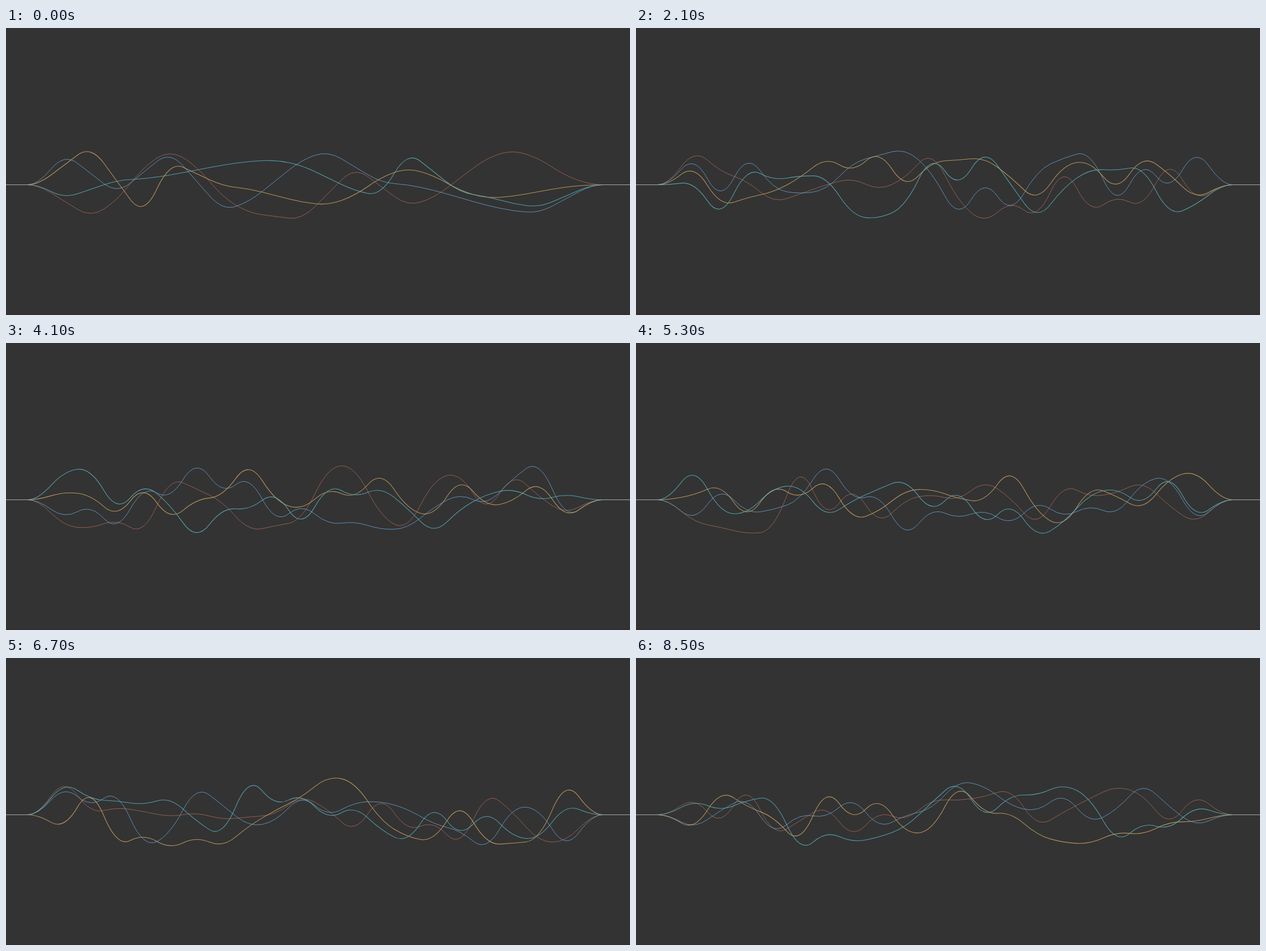
Animation of 1102x508 px, one loop 8600 ms. Source, as an HTML page with a canvas:

```html
<!DOCTYPE html>
<html lang="en">
<head>
<meta charset="utf-8">
<title>Waves</title>
<style>
  html, body { margin: 0; width: 100%; height: 100%; overflow: hidden; background: #333; }
  canvas { display: block; }
</style>
</head>
<body>
<canvas id="stage" width="1102" height="508"></canvas>
<script>
const ctx = document.getElementById('stage').getContext('2d');
const W = 1102, H = 508, MID = 277, AXIS = MID + 0.5;
const LOOP = 8600, STEP = 100;
const LEFT = 40, RIGHT = 1052;
const COUNT = 20, GAP = 46.6, FIRST = 56.4;   // handle 0 and COUNT + 1 rest on the axis
const REACH = 74;

// Crests give the main bends at the start: handle number and offset.
const waves = [
  { color: 'rgba(210,122,100,.76)', width: 0.8,
    crests: { 2: 58, 5: -62, 8: 50, 10: 62, 12: -32, 14: 38, 18: -62 } },
  { color: 'rgba(106,166,216,.8)', width: 1,
    crests: { 1: -56, 3: 16, 5: -60, 7: 46, 11: -60, 13: -4, 19: 50 } },
  { color: 'rgba(214,172,100,.8)', width: 1.1,
    crests: { 2: -70, 4: 58, 5: -42, 7: 2, 11: 36, 14: -30, 17: 24 } },
  { color: 'rgba(92,184,196,.8)', width: 1.1,
    crests: { 1: 24, 3: -8, 9: -44, 13: 20, 14: -60, 16: 14, 19: 40 } }
];

// Repeatable value in 0..1
function random(...seed) {
  const n = seed.reduce((sum, s) => sum * 31.7 + s, 4.3);
  const s = Math.sin(n * 12.9898) * 43758.5453;
  return s - Math.floor(s);
}

const ease = u => (1 - Math.cos(Math.PI * u)) / 2;
const mix = (a, b, u) => a + (b - a) * ease(u);

function opening(wave, i) {
  const { crests } = waves[wave];
  const stops = [0, ...Object.keys(crests).map(Number), COUNT + 1];
  const next = stops.findIndex(s => s >= i);
  const a = stops[next - 1], b = stops[next];
  return mix(crests[a] || 0, crests[b] || 0, (i - a) / (b - a));
}

function target(wave, i, n) {
  return n === 0 ? opening(wave, i) : (2 * random(wave, i, n) - 1) * REACH;
}

// Every handle glides from one random height to the next at its own pace.
function handleY(wave, i, t) {
  if (i < 1 || i > COUNT) return AXIS;
  const u = t / (1400 + 1100 * random(wave, i));
  const n = Math.floor(u);
  return AXIS + mix(target(wave, i, n), target(wave, i, n + 1), u - n);
}

function drawWave(wave, t) {
  const x = i => FIRST + GAP * i;
  const y = Array.from({ length: COUNT + 2 }, (_, i) => handleY(wave, i, t));
  ctx.beginPath();
  ctx.moveTo(LEFT - 2, AXIS);
  for (let i = 0; i <= COUNT; i++) {
    ctx.quadraticCurveTo(x(i), y[i], x(i + 0.5), (y[i] + y[i + 1]) / 2);
  }
  ctx.quadraticCurveTo(x(COUNT + 1), AXIS, RIGHT + 2, AXIS);
  ctx.strokeStyle = waves[wave].color;
  ctx.lineWidth = waves[wave].width;
  ctx.stroke();
}

function draw(t) {
  ctx.fillStyle = '#333';
  ctx.fillRect(0, 0, W, H);
  ctx.fillStyle = '#362f31';
  ctx.fillRect(0, H - 3, W, 3);
  waves.forEach((_, wave) => drawWave(wave, t));
  ctx.fillStyle = '#a9a9a6';
  ctx.fillRect(0, MID, LEFT, 1);
  ctx.fillRect(RIGHT, MID, W - RIGHT, 1);
}

const start = performance.now();
function tick() {
  const t = (performance.now() - start) % LOOP;
  draw(Math.floor(t / STEP) * STEP);
  requestAnimationFrame(tick);
}
tick();
</script>
</body>
</html>
```
